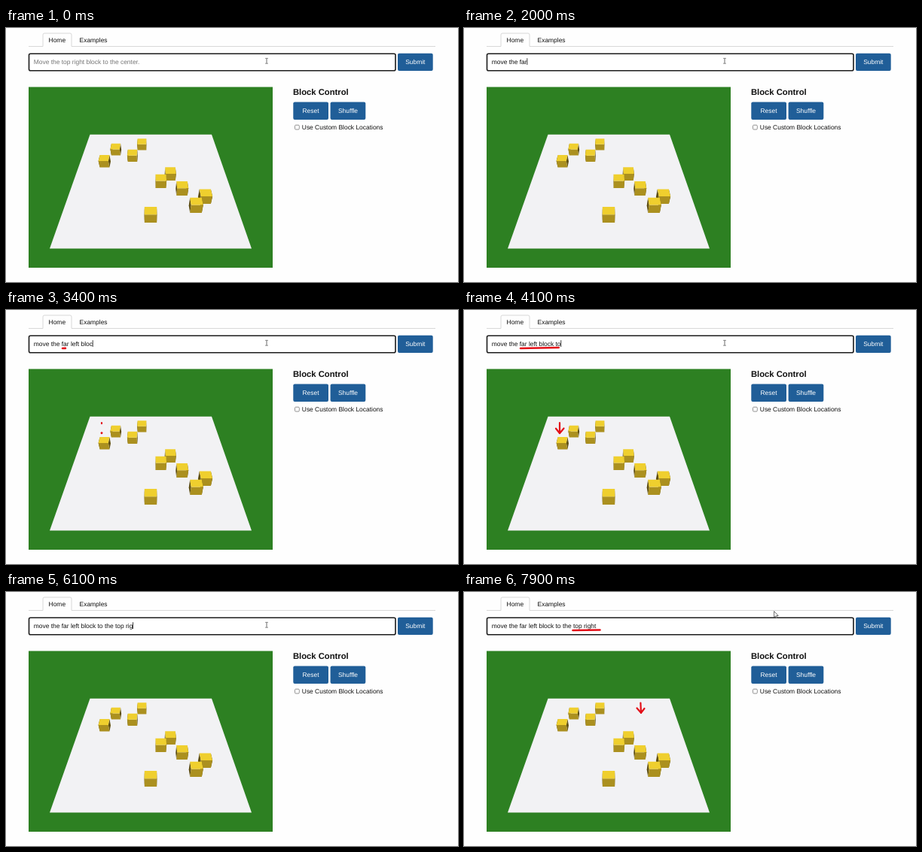
Animation, 600 px wide and 338 px high, one loop 8000 ms. Source, as an HTML page:

```html
<!DOCTYPE html>
<html lang="en">
<head>
<meta charset="utf-8">
<title>Block Control</title>
<style>
  html, body { margin: 0; height: 100%; overflow: hidden; background: #fefefe; }
  svg { display: block; width: 600px; height: 338px; }
  text {
    font: 8.43px "Liberation Sans", Arial, sans-serif;
    fill: #111; white-space: pre; text-rendering: geometricPrecision;
  }
  .button rect { fill: #205e98; }
  .button text { fill: #fff; text-anchor: middle; }
  .title { font-size: 11.24px; font-weight: bold; }
  #marks path { fill: none; stroke: #e30f18; stroke-linecap: round; stroke-linejoin: round; }
</style>
</head>
<body>
<svg viewBox="0 0 600 338">
  <path d="M30 24.5H49V9q0-2 2-2H85q2 0 2 2V24.5H570" fill="none" stroke="#d8d8d8"/>
  <text x="56.6" y="18.7">Home</text>
  <text x="97.6" y="18.7">Examples</text>

  <rect x="30.5" y="34.2" width="486.5" height="22.6" rx="2" fill="#fff" stroke="#1c1c1c" stroke-width="1.6"/>
  <text id="input" x="36.8" y="47.6"></text>
  <path id="caret" d="M0 40.2V49" stroke="#111" stroke-width=".8"/>
  <g class="button">
    <rect x="520" y="33.7" width="46.7" height="23.4" rx="2"/><text x="543.3" y="47.6">Submit</text>
    <rect x="381.3" y="98.6" width="46.7" height="23.4" rx="2"/><text x="404.5" y="113">Reset</text>
    <rect x="430.6" y="98.6" width="46.7" height="23.4" rx="2"/><text x="454" y="113">Shuffle</text>
  </g>

  <text class="title" x="381" y="88.7">Block Control</text>
  <rect x="383.5" y="129.2" width="5.8" height="5.8" rx="1.2" fill="#fff" stroke="#767676" stroke-width=".8"/>
  <text x="392.8" y="135.4">Use Custom Block Locations</text>

  <rect x="30" y="78.5" width="324" height="240.5" fill="#2d8022"/>
  <path d="M111.5 141.7H273L326 293.5H58Z" fill="#f2f2f4"/>
  <g id="blocks"></g>
  <g id="marks"></g>

  <path id="beam" d="M-1.7-3.4H-.5L0-3L.5-3.4H1.7M0-3V3M-1.7 3.4H-.5L0 3L.5 3.4H1.7" fill="none" stroke="#444" stroke-width=".8"/>
  <path id="pointer" d="M0 0V8L1.8 6.4L3.1 9.1L4.3 8.5L3.1 5.9H5.6Z" fill="#fff" stroke="#333" stroke-width=".7"/>
</svg>
<script>
const LOOP = 8000, STEP = 100;
const PLACEHOLDER = 'Move the top right block to the center.';
const COMMAND = 'move the far left block to the top right';
// [ms, characters typed]
const TYPING = [[550, 0], [1300, 6], [2000, 12], [3400, 22], [5000, 32], [6100, 38], [6250, 40]];
const LAST_KEY = 6250, BLINK = 530;
const CENTER_X = 192;

// Centre and bottom of each block's front face, back to front
const BLOCKS = [
  [180.5, 162.5], [146, 169.5], [168, 178], [131, 185.5], [218, 203],
  [205.5, 213], [233.5, 223], [264.3, 234], [252, 246], [192, 259]
];

// Each stroke is x1, y1, x2, y2, and grows from its first point
const MARKS = [
  { start: 3360, end: 5350, underline: [75, 51, 125.7, 50], arrow: [127, 150, 127, 164], head: [[122, 157.7], [132.5, 157.5]] },
  { start: 6450, end: LOOP, underline: [144.5, 51, 180.5, 50.5], arrow: [234.4, 147.5, 235, 160.7], head: [[229.5, 154.5], [239.5, 155]] }
];
const DRAW_TIME = 520;

const byId = id => document.getElementById(id);
const clamp = v => Math.min(1, Math.max(0, v));
const lerp = (a, b, p) => a + (b - a) * p;
const show = (el, on) => el.setAttribute('visibility', on ? 'visible' : 'hidden');
const moveTo = (el, x, y) => el.setAttribute('transform', `translate(${x} ${y})`);

function blockMarkup([cx, bottom]) {
  const w = 0.0665 * (161.5 + (bottom - 142) * 0.703);
  const corner = (side, scale, rise) =>
    `${CENTER_X + (cx + side * w / 2 - CENTER_X) * scale},${bottom - rise * w}`;
  const foot = s => corner(s, 1, 0), front = s => corner(s, 1.029, 0.67);
  const back = s => corner(s, 1, 1.3), backFoot = s => corner(s, 0.971, 0.62);
  const face = (color, ...points) => `<polygon points="${points.join(' ')}" fill="${color}"/>`;
  const side = s => face('#5f4f12', foot(s), front(s), back(s), backFoot(s));
  return side(-1) + side(1) +
    face('#ab901f', foot(-1), front(-1), front(1), foot(1)) +
    face('#efcf2e', front(-1), back(-1), back(1), front(1));
}

function markMarkup({ start, end, underline, arrow, head }, t) {
  if (t < start || t >= end) return '';
  const p = clamp((t - start) / DRAW_TIME);
  const stroke = ([x1, y1, x2, y2], width) =>
    `<path d="M${x1} ${y1}L${lerp(x1, x2, p)} ${lerp(y1, y2, p)}" stroke-width="${width}"/>`;
  const tip = arrow.slice(2);
  return stroke(underline, 2.6) + stroke(arrow, 2.2) +
    head.map(point => stroke([...tip, ...point], 2.2)).join('');
}

function typedCount(t) {
  const i = TYPING.findIndex(([time]) => time > t);
  if (i < 0) return COMMAND.length;
  if (i === 0) return 0;
  const [t0, n0] = TYPING[i - 1], [t1, n1] = TYPING[i];
  return Math.floor(lerp(n0, n1, (t - t0) / (t1 - t0)) + 0.5);
}

function render(t) {
  const count = typedCount(t);
  const input = byId('input'), caret = byId('caret');
  input.textContent = count ? COMMAND.slice(0, count) : PLACEHOLDER;
  input.style.fill = count ? '#111' : '#757575';
  moveTo(caret, 37 + (count ? input.getComputedTextLength() : 0), 0);
  const blinkOn = t < LAST_KEY || Math.floor((t - LAST_KEY) / BLINK) % 2 === 0;
  show(caret, t >= 100 && blinkOn);

  byId('marks').innerHTML = MARKS.map(mark => markMarkup(mark, t)).join('');

  const p = clamp((t - 7600) / 300);
  const x = lerp(346, 411.6, p), y = lerp(43.8, 25.6, p);
  const overInput = y > 33;
  for (const [id, on] of [['beam', overInput], ['pointer', !overInput]]) {
    moveTo(byId(id), x, y);
    show(byId(id), on);
  }
}

byId('blocks').innerHTML = BLOCKS.map(blockMarkup).join('');
const begin = performance.now();
function tick() {
  const t = (performance.now() - begin) % LOOP;
  render(Math.floor(t / STEP) * STEP);
  requestAnimationFrame(tick);
}
tick();
</script>
</body>
</html>
```
